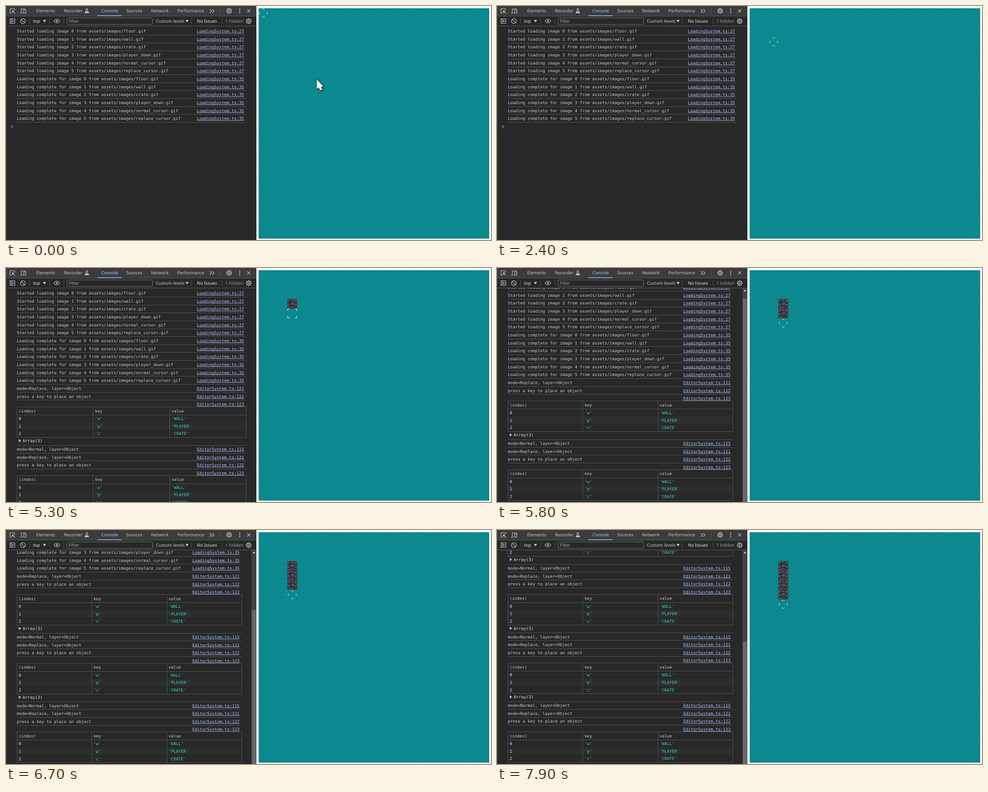
These frames come from a looping animation (1077x520 px, 8000 ms). An HTML page with a canvas:

```html
<!DOCTYPE html>
<html lang="en">
<head>
<meta charset="utf-8">
<title>Tile editor with console</title>
<style>
  html, body { margin: 0; width: 100%; height: 100%; overflow: hidden; background: #fff; }
  canvas { display: block; }
</style>
</head>
<body>
<canvas id="stage" width="1077" height="520"></canvas>
<script>
const ctx = document.getElementById('stage').getContext('2d');
ctx.textRendering = 'geometricPrecision';
const LOOP = 8000, POINTER_HIDDEN = 2300;
const CELL = 64 / 3, MAP = { x: 561, y: 5, size: 512 };
const MONO = '9.16px "DejaVu Sans Mono", monospace';
const SANS = '9.75px "Noto Sans", "Open Sans", sans-serif';
const INK = '#c4c7c9', BRIGHT = '#e3e3e3', LINK = '#a8c7fa', BLUE = '#7cacf8', TEAL = '#35d4c7', RULE = '#515356';

// time, cursor column, cursor row, tables logged, walls placed
const STEPS = [
  [0, 0, 0, 0, 0], [1700, 0, 1, 0, 0], [1900, 0, 2, 0, 0], [2000, 0, 3, 0, 0],
  [2200, 1, 3, 0, 0], [2400, 2, 3, 0, 0], [4200, 3, 3, 1, 0], [4400, 3, 3, 1, 1],
  [5000, 3, 4, 1, 1], [5300, 3, 4, 2, 1], [5500, 3, 4, 2, 2], [5800, 3, 5, 2, 2],
  [6300, 3, 5, 3, 2], [6500, 3, 5, 3, 3], [6700, 3, 6, 3, 3], [7200, 3, 6, 4, 3],
  [7400, 3, 6, 4, 4], [7900, 3, 7, 4, 4]
];

function rect(x, y, w, h, color) {
  ctx.fillStyle = color;
  ctx.fillRect(x, y, w, h);
}

function text(str, x, midY, color, font = MONO) {
  ctx.font = font;
  ctx.fillStyle = color;
  ctx.fillText(str, x, midY + 3.2);
}

function stroke(path, color = INK, width = 1.2) {
  ctx.strokeStyle = color;
  ctx.lineWidth = width;
  ctx.stroke(new Path2D(path));
}

function fill(path, color = INK) {
  ctx.fillStyle = color;
  ctx.fill(new Path2D(path));
}

function circle(x, y, r, color, width) {
  ctx.beginPath();
  ctx.arc(x, y, r, 0, Math.PI * 2);
  if (width) {
    ctx.strokeStyle = color;
    ctx.lineWidth = width;
    ctx.stroke();
  } else {
    ctx.fillStyle = color;
    ctx.fill();
  }
}

function gear(x, y) {
  for (let i = 0; i < 8; i++) {
    const a = i * Math.PI / 4, c = Math.cos(a), s = Math.sin(a);
    stroke(`M${x + c * 4.4} ${y + s * 4.4}L${x + c * 6.2} ${y + s * 6.2}`, INK, 2);
  }
  circle(x, y, 4.4, INK, 1.2);
  circle(x, y, 1.7, INK, 1.2);
}

function drawToolbars() {
  rect(0, 0, 556, 22, '#3c3c3c');
  rect(0, 22, 556, 23, '#282828');
  rect(0, 22, 556, 1, '#5a5a5a');
  rect(0, 44, 556, 1, '#5a5a5a');

  // tab bar
  stroke('M13 16H9V6H19V10', INK, 1.2);
  stroke('M20 17L14 11M14 15V11H18', INK, 1.3);
  stroke('M34 14V6.5H44M31 15.5H38M39.5 8.5H44V16H39.5Z');
  [['Elements', 67], ['Recorder', 128.5], ['Console', 212], ['Sources', 267], ['Network', 322], ['Performance', 380.5]]
    .forEach(([label, x]) => text(label, x, 10.7, label === 'Console' ? LINK : INK, SANS));
  rect(203, 20.7, 54, 1.8, BLUE);
  stroke('M177.5 6H181.5M178.3 6V10L175.3 15.5H183.7L180.7 10V6');
  fill('M177 12.5H182L183.5 15.5H175.5Z');
  stroke('M452.5 7L456.5 11L452.5 15M458 7L462 11L458 15');
  rect(475, 5, 1, 12, '#56585a');
  gear(495.5, 10.8);
  for (const y of [6.7, 10.8, 14.9]) circle(519, y, 1.2, INK);
  stroke('M535.5 7.3L542.5 14.3M542.5 7.3L535.5 14.3');

  // console controls
  stroke('M9 28.5H19.5V38.5H9ZM12 28.5V38.5');
  fill('M14 31L17.5 33.5L14 36Z');
  circle(37.5, 33.5, 5.4, INK, 1.2);
  stroke('M33.8 29.8L41.2 37.2');
  for (const x of [52, 96, 128, 411, 479]) rect(x, 27, 1, 13, '#4c4e50');
  text('top', 60, 33.7, BRIGHT, SANS);
  fill('M82 31H89L85.5 36.5Z');
  stroke('M106.5 33.5Q113 25 119.5 33.5Q113 42 106.5 33.5Z');
  circle(113, 33.5, 2, INK);
  ctx.beginPath();
  ctx.roundRect(135.5, 26.5, 190, 14.5, 2);
  ctx.strokeStyle = '#757575';
  ctx.lineWidth = 1;
  ctx.stroke();
  text('Filter', 139.5, 33.7, '#a0a3a5', SANS);
  text('Custom levels', 333, 33.7, INK, SANS);
  fill('M398.5 31H405.5L402 36.5Z');
  text('No Issues', 424, 33.7, BRIGHT, SANS);
  text('1 hidden', 487, 33.7, '#96999c', SANS);
  gear(539, 33.7);
}

function logLink(label, y, right) {
  ctx.font = MONO;
  const width = ctx.measureText(label).width, x = right - 5.5 - width;
  text(label, x, y, LINK);
  rect(x, y + 4.2, width, 0.8, LINK);
}

function logRow(message, link, y, right) {
  text(message, 24, y, INK);
  logLink(link, y, right);
  rect(24, Math.round(y + 8), right - 26, 1, RULE);
}

function logTable(y, right) {
  const top = Math.round(y + 40.3), column = (right - 24.5) / 3;
  const height = 68;
  rect(24, top + 35, right - 24, 16, '#2c2e2e');
  ctx.strokeStyle = RULE;
  ctx.lineWidth = 1;
  ctx.strokeRect(24.5, top + 0.5, right - 25, height);
  rect(24, top + 18, right - 24, 1, RULE);
  for (const i of [1, 2]) rect(Math.floor(24 + column * i), top, 1, height, RULE);
  const cells = (values, midY, colors) =>
    values.forEach((value, i) => text(value, 28 + column * i, midY, colors[i]));
  cells(['(index)', 'key', 'value'], y + 49.7, [INK, INK, INK]);
  [['0', "'w'", "'WALL'"], ['1', "'p'", "'PLAYER'"], ['2', "'c'", "'CRATE'"]]
    .forEach((row, i) => cells(row, y + 67.2 + i * 16.6, [BRIGHT, TEAL, TEAL]));
  const mid = y + 116;
  fill(`M28.5 ${mid - 3.5}L33.5 ${mid}L28.5 ${mid + 3.5}Z`);
  text('Array(3)', 37, mid, BRIGHT);
  rect(24, Math.round(y + 126), right - 26, 1, RULE);
}

function drawConsole(tables, walls) {
  const PITCH = 17.64, BLOCK = 152.6, FIRST = 267.8;
  const promptY = FIRST + BLOCK * walls + (tables > walls ? 135 : 0);
  const scroll = Math.max(0, promptY - 560.4);
  const right = scroll ? 524 : 534;

  rect(0, 0, 556, 520, '#282828');
  ctx.save();
  ctx.beginPath();
  ctx.rect(0, 45, 556, 475);
  ctx.clip();
  ctx.translate(0, -Math.round(scroll));

  const files = ['floor', 'wall', 'crate', 'player_down', 'normal_cursor', 'replace_cursor'];
  ['Started loading', 'Loading complete for'].forEach((verb, group) => files.forEach((file, i) =>
    logRow(`${verb} image ${i} from assets/images/${file}.gif`, `LoadingSystem.ts:${group ? 35 : 27}`,
      56 + (group * 6 + i) * PITCH, right)));

  for (let i = 0; i < tables; i++) {
    const y = FIRST + i * BLOCK;
    logRow('mode=Replace, layer=Object', 'EditorSystem.ts:121', y, right);
    logRow('press a key to place an object', 'EditorSystem.ts:122', y + PITCH, right);
    logLink('EditorSystem.ts:123', y + 2 * PITCH, right);
    logTable(y, right);
    if (i < walls) logRow('mode=Normal, layer=Object', 'EditorSystem.ts:115', y + 135, right);
  }
  stroke(`M11.5 ${promptY - 3}L14.5 ${promptY + 0.3}L11.5 ${promptY + 3.6}`, BLUE, 1.2);
  ctx.restore();

  if (scroll) {
    rect(545, 45, 11, 475, '#424242');
    fill('M547.5 52L550.5 48L553.5 52Z', '#c8c8c8');
    const thumb = Math.round(56 + scroll * 510 / (527 + scroll));
    rect(546, thumb, 9, 520 - thumb, '#686868');
  }
  drawToolbars();
  rect(0, 0, 1, 520, '#4a4a4a');
}

// Three by three floor tiles make a whole number of pixels.
function makeFloor() {
  const tile = document.createElement('canvas');
  tile.width = tile.height = 64;
  const c = tile.getContext('2d');
  c.fillStyle = '#0b8b90';
  c.fillRect(0, 0, 64, 64);
  c.scale(2 / 3, 2 / 3);
  const specks = [[3, 3], [13, 1], [24, 5], [8, 10], [18, 9], [29, 12], [2, 18], [13, 17], [23, 19], [7, 26], [18, 25], [28, 27]];
  for (let i = 0; i < 9; i++) {
    for (const [x, y] of specks) {
      const left = i % 3 * 32 + x, top = Math.floor(i / 3) * 32 + y;
      c.fillStyle = 'rgba(31,68,88,.55)';
      c.fillRect(left, top, 2.6, 1.5);
      c.fillStyle = 'rgba(25,90,105,.25)';
      c.fillRect(left + 2, top + 1.5, 2, 1.2);
    }
  }
  return ctx.createPattern(tile, 'repeat');
}
const floor = makeFloor();

function drawWall(column, row) {
  ctx.save();
  ctx.translate(MAP.x + column * CELL, MAP.y + row * CELL);
  ctx.scale(2 / 3, 2 / 3);
  rect(0, 0, 32, 32, '#2c222e');
  ctx.lineJoin = 'round';
  for (const stone of ['M0 1L7 1L10 6L4 11L0 9Z', 'M10 1L21 1L19 7L13 8Z', 'M24 1L32 1V9L26 12L21 8Z',
    'M12 11L20 10L24 15L20 21L12 20L9 15Z', 'M0 13L5 13L9 19L6 24L0 23Z',
    'M26 15L32 13V23L25 24L23 20Z', 'M2 27L8 25L14 27L13 32H1Z', 'M12 23L21 24L23 29L17 31L15 26Z', 'M25 27L32 26V32H25Z']) {
    fill(stone, '#48505b');
    stroke(stone, '#52343f', 0.9);
  }
  ctx.restore();
}

function drawCursor(column, row, replacing) {
  ctx.save();
  ctx.translate(MAP.x + (column + 0.5) * CELL, MAP.y + (row + 0.5) * CELL);
  for (let i = 0; i < 4; i++) {
    stroke(replacing ? 'M-10 -5.7V-10H-5.7' : 'M-2.7 -7.2L0 -9.9L2.7 -7.2', '#f2ffff', 1);
    ctx.rotate(Math.PI / 2);
  }
  ctx.restore();
}

function drawPointer() {
  const arrow = 'M690 163V184.5L694.3 181L698 187.5L702 185.5L699.3 179.7L704.5 178.7Z';
  ctx.save();
  ctx.lineJoin = 'round';
  ctx.shadowColor = 'rgba(0,0,0,.5)';
  ctx.shadowBlur = 3;
  ctx.shadowOffsetX = ctx.shadowOffsetY = 1;
  stroke(arrow, '#17383b', 2);
  ctx.restore();
  fill(arrow, '#fff');
}

function draw(time) {
  const [, column, row, tables, walls] = STEPS.findLast(step => step[0] <= time);
  rect(0, 0, 1077, 520, '#fff');
  drawConsole(tables, walls);

  ctx.save();
  ctx.translate(MAP.x, MAP.y);
  rect(0, 0, MAP.size, MAP.size, floor);
  ctx.restore();
  for (let i = 0; i < walls; i++) drawWall(3, 3 + i);
  drawCursor(column, row, tables > walls);
  if (time < POINTER_HIDDEN) drawPointer();
}

const start = performance.now();
function tick() {
  draw((performance.now() - start) % LOOP);
  requestAnimationFrame(tick);
}
tick();
</script>
</body>
</html>
```
